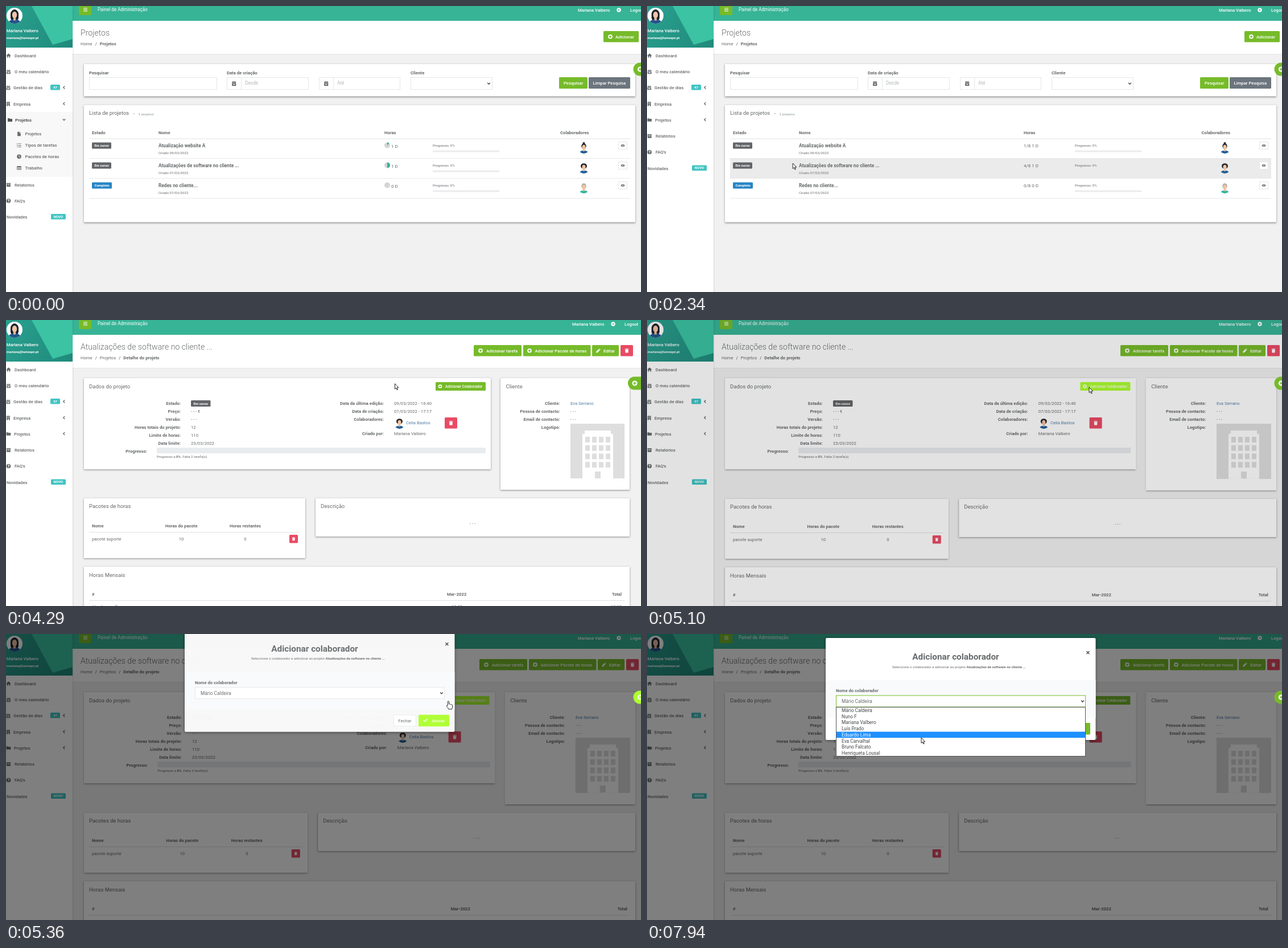
An HTML page with a canvas for the animation above (8000 ms loop, 1116 by 502 pixels).

```html
<!DOCTYPE html>
<html lang="pt">
<head>
<meta charset="utf-8">
<title>Painel de Administração</title>
<style>
html, body { margin: 0; width: 100%; height: 100%; overflow: hidden; background: #f1f1f1; }
canvas { display: block; }
</style>
</head>
<body>
<canvas id="stage" width="1116" height="502"></canvas>
<script>
const c = document.getElementById('stage').getContext('2d');
const LOOP = 8000;
const GREEN = '#76bb2a', LIME = '#adff2f', TEAL = '#37b496', TXT = '#676a6c', RED = '#e94b64', LINK = '#4f7ca6', AQUA = '#40c4c4';
const USER = 'Mariana Valbero', MAIL = 'mariana@lumeqor.pt', MEMBER = 'Celia Bastos', CLIENT = 'Eva Serrano';
const PEOPLE = ['Mário Caldeira', 'Nuno F', USER, 'Luís Prado', 'Eduardo Lima', 'Eva Carvalhal', 'Bruno Falcato', 'Henriqueta Lousal'];
const PROJECT = 'Atualizações de software no cliente ...';

const DISC = 'M-4 0A4 4 0 1 1 4 0A4 4 0 1 1-4 0Z';
const ICONS = {
  home: 'M-4.4 0L0-4L4.4 0H3V3.6H.9V1H-.9V3.6H-3V0Z',
  cal: 'M-3.5-3H-2V-4H-1V-3H1V-4H2V-3H3.5V4H-3.5ZM-3.5-1.5V-.7H3.5V-1.5ZM-2 .7V2.3H2V.7Z',
  building: 'M-3-4H3V4H1V2H-1V4H-3ZM-1.6-3V-1.8H-.5V-3ZM.5-3V-1.8H1.6V-3ZM-1.6-.8V.4H-.5V-.8ZM.5-.8V.4H1.6V-.8Z',
  folder: 'M-4-3H-1L0-2H4V3H-4Z',
  file: 'M-3-4H.6V-1.4H3V4H-3ZM1.2-4L3-2H1.2Z',
  list: 'M-4-3.5H-2.6V-2.3H-4ZM-1.5-3.4H4V-2.4H-1.5ZM-4-.6H-2.6V.6H-4ZM-1.5-.5H4V.5H-1.5ZM-4 2.3H-2.6V3.5H-4ZM-1.5 2.4H4V3.4H-1.5Z',
  clock: DISC + 'M-.5-2.5V.4L1.5 1.8L2 1.1L.5 0V-2.5Z',
  table: 'M-4-3.4H4V3.4H-4ZM-3-1.2V.2H-.5V-1.2ZM.5-1.2V.2H3V-1.2ZM-3 1.1V2.4H-.5V1.1ZM.5 1.1V2.4H3V1.1Z',
  archive: 'M-4-3.5H4V-1.5H-4ZM-3.5-1H3.5V3.5H-3.5ZM-1.2-.2V.6H1.2V-.2Z',
  help: DISC + 'M-1.6-1A1.6 1.6 0 1 1 .5.6V1.2H-.5V0A.7.7 0 1 0-.7-1ZM-.5 1.8H.5V2.8H-.5Z',
  plus: DISC + 'M-.7-2.3H.7V-.7H2.3V.7H.7V2.3H-.7V.7H-2.3V-.7H-.7Z',
  trash: 'M-3.5-3.5H-1.2L-.8-4H.8L1.2-3.5H3.5V-2.5H-3.5ZM-3-2H3L2.6 4H-2.6Z',
  pencil: 'M-4 4L-3.6 1.6L.8-2.8L2.8-.8L-1.6 3.6ZM1.4-3.4L2.2-4L4-2.2L3.4-1.4Z',
  gear: 'M-.8-4H.8L1.1-2.7 2.3-3.4 3.4-2.3 2.7-1.1 4-.8V.8L2.7 1.1 3.4 2.3 2.3 3.4 1.1 2.7 .8 4H-.8L-1.1 2.7-2.3 3.4-3.4 2.3-2.7 1.1-4 .8V-.8L-2.7-1.1-3.4-2.3-2.3-3.4-1.1-2.7ZM-1.3 0A1.3 1.3 0 1 0 1.3 0A1.3 1.3 0 1 0-1.3 0Z',
  eye: 'M-4 0Q0-5 4 0Q0 5-4 0ZM-1.7 0A1.7 1.7 0 1 0 1.7 0A1.7 1.7 0 1 0-1.7 0ZM-.9 0A.9.9 0 1 0 .9 0A.9.9 0 1 0-.9 0Z',
  check: 'M-4 .2L-2.8-1L-1.2.8L2.9-3.2L4-2L-1.2 3Z',
  menu: 'M-3.5-3H3.5V-2H-3.5ZM-3.5-.5H3.5V.5H-3.5ZM-3.5 2H3.5V3H-3.5Z'
};
for (const k in ICONS) ICONS[k] = new Path2D(ICONS[k]);
const ARROW = new Path2D('M0 0V9.4L2.2 7.5L3.7 11L5.2 10.4L3.7 7H6.6Z');
const HAND = new Path2D('M0 0C1-.5 1.5.2 1.5 1V5C3 4.6 3.6 5 3.9 5.6C5 5.2 5.6 5.6 6 6.2C7 6 7.6 6.6 7.6 7.5V10C7.6 12 6.5 12.5 6.5 14H1C.8 12.5-1.6 10.5-2.6 8.3C-2.9 7.2-1.6 6.8-.8 7.8V.9Q-.8.2 0 0Z');

// Pointer stops: time, x, y
const PATH = [[70, 420, 416], [300, 262, 300], [560, 95, 224], [760, 50, 204], [960, 48, 206], [1100, 40, 221], [1310, 40, 221],
  [1390, 43, 228], [2050, 43, 228], [2340, 256, 276], [2600, 305, 275], [2800, 305, 275], [2870, 309, 278], [3070, 309, 278],
  [3270, 321, 281], [3900, 321, 281], [4290, 683, 112], [4440, 745, 74], [4700, 775, 117], [4970, 775, 117], [5060, 777, 118],
  [5420, 777, 118], [5770, 621, 103], [5840, 619, 104], [6040, 619, 104], [6120, 620, 111], [6300, 620, 111], [6930, 483, 187],
  [7730, 483, 186], [7940, 482, 182], [LOOP, 482, 182]];

const clamp = v => Math.max(0, Math.min(1, v));

function pointer(t) {
  const i = PATH.findIndex(p => p[0] > t);
  const [t0, x0, y0] = PATH[i - 1], [t1, x1, y1] = PATH[i], k = (t - t0) / (t1 - t0);
  return [x0 + (x1 - x0) * k, y0 + (y1 - y0) * k];
}

// y is the middle of the capitals
function text(s, x, y, size = 7.7, color = TXT, weight = 400, align = 'left') {
  c.font = `${weight} ${size}px Roboto, sans-serif`;
  c.fillStyle = color;
  c.textAlign = align;
  c.fillText(s, x, y + size * .36);
  return c.measureText(s).width;
}
const bold = (s, x, y, align, size = 7.7) => text(s, x, y, size, TXT, 700, align);
function rect(x, y, w, h, color) { c.fillStyle = color; c.fillRect(x, y, w, h); }
function round(x, y, w, h, color, r = 1.5) {
  c.fillStyle = color;
  c.beginPath(); c.roundRect(x, y, w, h, r); c.fill();
}
function box(x, y, w, h, color = '#e5e6e7', fill = '#fff') {
  rect(x, y, w, h, fill);
  c.strokeStyle = color; c.lineWidth = 1;
  c.strokeRect(x + .5, y + .5, w - 1, h - 1);
}
function disc(x, y, r, color) { oval(x, y, r, r, color); }
function oval(x, y, rx, ry, color) {
  c.fillStyle = color;
  c.beginPath(); c.ellipse(x, y, rx, ry, 0, 0, 7); c.fill();
}
function icon(name, x, y, color = TXT, k = 1) {
  c.save(); c.translate(x, y); c.scale(k, k);
  c.fillStyle = color; c.fill(ICONS[name], 'evenodd');
  c.restore();
}
function chevron(x, y, down, color = TXT) {
  c.strokeStyle = color; c.lineWidth = 1.3;
  c.beginPath();
  if (down) { c.moveTo(x - 2.3, y - 1.2); c.lineTo(x, y + 1.2); c.lineTo(x + 2.3, y - 1.2); }
  else { c.moveTo(x + 1.2, y - 2.5); c.lineTo(x - 1.2, y); c.lineTo(x + 1.2, y + 2.5); }
  c.stroke();
}
function card(x, y, w, h) {
  c.save();
  c.shadowColor = 'rgba(0,0,0,.42)'; c.shadowBlur = 3; c.shadowOffsetY = 1;
  rect(x, y, w, h, '#fff');
  c.restore();
}
function button(x, y, w, h, color, name, label, ix, tx, size = 7.7) {
  round(x, y, w, h, color);
  if (name) icon(name, x + ix, y + h / 2, '#fff', size / 8);
  if (label) text(label, x + tx, y + h / 2, size, '#fff', 500);
}
function badge(x, y, w, color, label, h = 11) {
  round(x, y, w, h, color);
  text(label, x + w / 2, y + h / 2, 6, '#fff', 700, 'center');
}
function avatar(x, y, r, hair, shirt, style) {
  c.save();
  c.beginPath(); c.arc(x, y, r, 0, 7); c.clip();
  if (style == 'long') { rect(x - r, y - r, 2 * r, 2 * r, '#fff'); round(x - r * .5, y - r * .7, r, r * 1.4, hair, r * .45); }
  if (style == 'bun') disc(x, y - r * .82, r * .2, hair);
  oval(x, y + r * 1.05, r * .85, r * .6, shirt);
  rect(x - r * .15, y + r * .1, r * .3, r * .5, '#e9b793');
  oval(x, y - r * .3, r * (style == 'curly' ? .55 : .42), r * .48, hair);
  oval(x, y - r * .1, r * .3, r * .42, '#f0c4a2');
  c.restore();
}
const TEAM = [['#2b2b33', '#1f5f9a', 'bun'], ['#25252b', '#1f5f9a', 'curly'], ['#b4b0a4', '#38b59c', 'short']];

function sidebar(open, hover, ready) {
  rect(0, 0, 117, 502, '#fff');
  const g = c.createLinearGradient(0, 0, 117, 73);
  g.addColorStop(0, '#2aa08f'); g.addColorStop(1, '#1f8a7b');
  rect(0, 0, 117, 73, g);
  c.fillStyle = '#3bc3a3';
  c.beginPath(); c.moveTo(45, 0); c.lineTo(82, 68); c.lineTo(117, 58); c.lineTo(117, 0); c.fill();
  if (ready) avatar(15, 17, 14, '#1d2330', '#23538c', 'long');
  text(USER, 1, 43, 7.6, '#fff', 500);
  text(MAIL, 1, 55.5, 6, '#fff', 700);

  const item = (name, label, x, y, ix = 4.5) => { if (name) icon(name, ix, y, TXT, .95); text(label, x, y, 7.7, TXT, 500); };
  item('home', 'Dashboard', 15, 87);
  item('cal', 'O meu calendário', 15, 115.5);
  item('cal', 'Gestão de dias', 13, 143.5, 4);
  badge(78, 138, 17, AQUA, '47', 9.5);
  chevron(102, 143, false);
  item('building', 'Empresa', 13, 172, 4);
  chevron(102, 171.5, false);
  if (open) {
    rect(0, 186, 117, 114, '#f8f8f8');
    if (hover == 1) rect(0, 186, 117, 28, GREEN);
    if (hover == 2) rect(0, 215, 117, 19, GREEN);
    icon('folder', 7, 200, '#555');
    text('Projetos', 16, 200, 7.7, '#555', 700);
    [['file', 'Projetos'], ['list', 'Tipos de tarefas'], ['clock', 'Pacotes de horas'], ['table', 'Trabalho']]
      .forEach(([n, s], i) => item(n, s, 33.5, 224.5 + 19.9 * i, 23));
  } else item('folder', 'Projetos', 14, 200);
  chevron(102, 199.5, open);
  const y = open ? 314 : 228.5;
  item('archive', 'Relatórios', 15, y);
  item('help', "FAQ's", 15, y + 28);
  item('', 'Novidades', 1, y + 56.5);
  badge(79, y + 51, 26, AQUA, 'NOVO', 9.5);
}

function header(dx, title, crumbs) {
  rect(117, 0, 999, 26, TEAL);
  round(128, -5, 22, 21, GREEN);
  icon('menu', 139.5, 6.5, '#fff');
  text('Painel de Administração', 161, 6, 8.15, '#fff');
  text(USER, 995 + dx, 7, 7.7, '#fff', 500);
  icon('gear', 1067 + dx, 7, '#fff');
  text('Logout', 1087 + dx, 7, 7.7, '#fff', 500);
  rect(117, 26, 999, 58.5, '#fff');
  rect(117, 84, 999, 1, '#e2e4e5');
  text(title, 131, 46.5, 14.1, TXT, 300);
  let x = 131;
  crumbs.forEach((s, i) => {
    const last = i == crumbs.length - 1;
    x += text(s, x, 66.5, 7.7, TXT, last ? 700 : 400) + 5;
    if (!last) x += text('/', x, 66.5, 7.7, TXT, 500) + 5;
  });
}

function listPage(plain, row) {
  header(10, 'Projetos', ['Home', 'Projetos']);
  button(1050, 44, 62, 19.5, GREEN, 'plus', 'Adicionar', 12, 21);
  card(137, 102, 969, 56.5);
  bold('Pesquisar', 146, 117);
  bold('Data de criação', 388, 117);
  bold('Cliente', 711, 117);
  box(146, 125, 225, 22);
  [[388, 144, 'Desde'], [550, 143, 'Até']].forEach(([x, w, s]) => {
    box(x, 125, w, 22);
    rect(x + 25, 125, 1, 22, '#e5e6e7');
    icon('cal', x + 12.7, 136, '#555');
    text(s, x + 32, 135.5, 8.3, '#b4b8bb');
  });
  box(711, 125, 144, 22);
  chevron(848.5, 136, true, '#444');
  button(972, 125, 50, 20, GREEN, '', 'Pesquisar', 0, 8);
  button(1024, 125, 73, 20, '#6c757d', '', 'Limpar Pesquisa', 0, 7.5);

  card(137, 174, 969, 205.5);
  text('Lista de projetos', 146, 188, 9.5);
  disc(225, 189, .9, '#a5b5b0');
  text('3 projetos', 232.5, 189.5, 6.1, '#8d9a9a');
  const nx = plain ? 267 : 268, hx = plain ? 662 : 665, px = plain ? 752 : 750;
  bold('Estado', 151, 222);
  bold('Nome', nx, 222);
  bold('Horas', hx, 222);
  bold('Colaboradores', plain ? 974.5 : 974, 222);
  rect(146, 232.5, 951, 1, '#dfe1e2');
  [['Atualização website A', '09', 1], [PROJECT, '07', 4], ['Redes no cliente...', '07', 0]].forEach(([name, day, part], i) => {
    const y = 245 + 35 * i, days = part ? '1 D' : '0 D';
    if (row == i) rect(146, y - 12, 951, 34, '#ebebeb');
    rect(146, y + 22, 951, 1, '#e7e9ea');
    badge(151, y - 5.5, i == 2 ? 35 : 34, i == 2 ? '#2785c6' : '#636568', i == 2 ? 'Completo' : 'Em curso');
    bold(name, nx, y, 'left', 8.25);
    text(`Criado ${day}/03/2022`, nx, y + 12.5, 6.2);
    if (plain) text(`${part}/8 ${days}`, hx, y, 8);
    else {
      disc(670, y - .5, 5, '#d3d5d6');
      c.fillStyle = TEAL;
      c.beginPath(); c.moveTo(670, y - .5);
      c.arc(670, y - .5, 5, -Math.PI / 2, -Math.PI / 2 + part * Math.PI / 4); c.fill();
      text(days, 677, y + 1.5, 8);
    }
    text('Progresso: 0%', px, y, 6.1);
    rect(px, y + 8.5, 117, 3, '#ebebee');
    avatar(1015.5, y + 4, 10, ...TEAM[i]);
    box(1076, y - 7, 16, 14);
    icon('eye', 1084, y, '#555', .9);
  });
}

function detailPage(wide, lit) {
  const dx = wide ? 10 : 0, dy = wide ? 1 : 0, k = wide ? 969 / 959 : 1;
  const X = x => 137 + (x - 137) * k;
  const panel = (x, y, r, b) => card(X(x), y, X(r) - X(x), b - y);
  const fields = (lx, vx, rows) => rows.forEach(([label, y, value, color]) => {
    bold(label + ':', X(lx), y, 'right');
    if (value) text(value, X(vx), y, 7.7, color);
  });
  header(dx, PROJECT, ['Home', 'Projetos', 'Detalhe do projeto']);
  button(822 + dx, 44, 84, 19.5, GREEN, 'plus', 'Adicionar tarefa', 12, 22);
  button(909 + dx, 44, 118.5, 19.5, GREEN, 'plus', 'Adicionar Pacote de horas', 11, 20.5);
  button(1030 + dx, 44, 47, 19.5, GREEN, 'pencil', 'Editar', 11, 20);
  button(1080 + dx, 44, 22, 19.5, RED, 'trash', '', 11);

  panel(137, 102, 852, 262);
  text('Dados do projeto', 146, 117, 9.5);
  button(X(755), 109, 88, 15, lit ? LIME : GREEN, 'plus', 'Adicionar Colaborador', 8, 17, 6.5);
  fields(307, 325, [['Estado', 146], ['Preço', 160, '- - - €'], ['Versão', 174, '- - -'], ['Horas totais do projeto', 188, '12'],
    ['Limite de horas', 202, '110'], ['Data limite', 216, '23/03/2022']]);
  badge(X(325), 141, 34.5, '#636568', 'Em curso');
  fields(664, 682, [['Data da última edição', 146, '09/03/2022 - 16:40'], ['Data de criação', 160, '07/03/2022 - 17:17'],
    ['Colaboradores', 174], ['Criado por', 199, USER]]);
  avatar(X(691.5), 181, 10, ...TEAM[1]);
  text(MEMBER, X(703), 180.5, 7.7, LINK);
  button(X(771), 171, 22, 19.5, RED, 'trash', '', 11);
  bold('Progresso:', X(248), 230, 'right');
  rect(X(265), 224, 578 * k, 10, '#e9ecef');
  let x = X(265);
  x += text('Progresso a ', x, 240, 6.1);
  x += bold('0%', x, 240, 'left', 6.1);
  text('. Falta 2 tarefa(s)', x, 240, 6.1);

  panel(869, 102, 1096, 298 + dy);
  text('Cliente', X(878.5), 117, 9.5);
  fields(973.5, 992, [['Cliente', 146, CLIENT, LINK], ['Pessoa de contacto', 160, '- - -'], ['Email de contacto', 174, '- - -'], ['Logotipo', 188]]);
  const bx = X(992);
  rect(bx, 182, 95 * k, 96 * k, '#dedede');
  rect(bx + 25, 194, 46, 8, '#fff');
  rect(bx + 21, 200, 54, 78 * k, '#fff');
  for (let i = 0; i < 16; i++) rect(bx + 26 + (i % 4) * 12, 205 + (i >> 2) * 14.7, 8, 10, '#dedede');
  rect(bx + 43, 266, 10, 12 * k, '#dedede');

  panel(137, 313 + dy, 526, 418 + dy);
  text('Pacotes de horas', 146, 327 + dy, 9.5);
  bold('Nome', 151, 361 + dy);
  bold('Horas do pacote', X(280), 361 + dy);
  bold('Horas restantes', X(393), 361 + dy);
  rect(146, 372 + dy, 371 * k, 1, '#dfe1e2');
  text('pacote suporte', 151, 384 + dy);
  text('10', X(308), 384 + dy, 7.7, TXT, 400, 'center');
  text('0', X(420.5), 384 + dy, 7.7, TXT, 400, 'center');
  button(X(498), 377 + dy, 15, 14.5, RED, 'trash', '', 7.5, 0, 6);
  panel(544, 313 + dy, 1096, 380 + dy);
  text('Descrição', X(553), 327 + dy, 9.5);
  text('- - -', X(820), 357 + dy, 7.7, TXT, 400, 'center');
  panel(137, 433 + dy, 1096, 520);
  text('Horas Mensais', 146, 447.5 + dy, 9.5);
  bold('#', 151, 481 + dy);
  bold('Mar-2022', X(775), 481 + dy);
  bold('Total', X(1082), 481 + dy, 'right');
  rect(146, 492 + dy, 941 * k, 1, '#dfe1e2');
  text('Atualizar software', 151, 503.5 + dy * 3);
  text('10:00', X(783), 503.5 + dy * 3);
  text('10:00', X(1082), 503.5 + dy * 3, 7.7, TXT, 400, 'right');
}

function fab(wide, color = GREEN) {
  const x = wide ? 1114 : 1104.5;
  round(x - 11.5, 99.5, 40, 23, color, 11.5);
  icon('plus', x + .5, 111, '#fff', 1.15);
}

function modal(t, lit, my) {
  const k = clamp((t - 5217) / 300), focus = t >= 6260;
  c.save();
  c.globalAlpha = clamp((t - 5217) / 150);
  c.translate(0, -45 * (1 - k) ** 1.75);
  c.save();
  c.shadowColor = 'rgba(0,0,0,.5)'; c.shadowBlur = 5; c.shadowOffsetY = 1;
  round(314, 7, 474.5, 179, '#fff', 2);
  c.restore();
  text('×', 775, 32, 13, '#555', 700, 'center');
  text('Adicionar colaborador', 542.5, 39.5, 15.3, TXT, 700, 'center');
  const x = 431 + text('Seleccione o colaborador a adicionar ao projeto ', 431, 57.5, 6.1);
  bold(PROJECT, x, 57.5, 'left', 6.1);
  rect(314, 81, 474.5, 66, '#f8fafb');
  bold('Nome do colaborador', 332, 99.5);
  box(332, 107.5, 439, 21, focus ? GREEN : '#e5e6e7');
  text(PEOPLE[0], 342, 118, 8.35);
  chevron(765.5, 118, true, '#333');
  box(681, 156, 40, 20.5, '#e7eaec');
  text('Fechar', 701, 166.5, 7.7, TXT, 400, 'center');
  button(725, 156, 54, 20.5, lit ? LIME : GREEN, 'check', 'Gravar', 12, 23.5);
  if (t >= 6330) {
    const pick = Math.max(0, Math.min(7, Math.floor((my - 128.6) / 10.7)));
    box(332, 128, 439, 87, '#555');
    PEOPLE.forEach((name, i) => {
      const y = 134 + 10.7 * i, on = i == (t > 7735 ? 4 : pick);
      if (on) rect(333, y - 5.3, 437, 10.7, '#1e90ff');
      text(name, 342, y, 8.35, on ? '#fff' : '#45484a');
    });
  }
  c.restore();
}

function draw(t) {
  const [mx, my] = t < 70 ? [-50, -50] : pointer(t);
  const list = t < 3410, open = t < 2050, wide = t < 3750 || t >= 5050;
  const lit = !list && t < 5450 && (t > 4970 || mx > 755 && mx < 843 && my > 109 && my < 124);
  const glow = t > 5220 && t < 5450;
  const hover = !open || mx > 117 ? 0 : my > 186 && my < 214 ? 1 : my >= 215 && my < 234 ? 2 : 0;
  const row = mx > 146 && my > 233 && my < 338 ? Math.floor((my - 233) / 35) : -1;

  rect(0, 0, 1116, 502, '#f1f1f1');
  if (list) listPage(t > 2050 && t < 2480, row); else detailPage(wide, lit);
  rect(117, 0, 1.5, 502, 'rgba(0,0,0,.08)');
  sidebar(open, hover, t < 3410 || t >= 3750);
  rect(0, 0, 1116, 502, `rgba(0,0,0,${clamp((t - 5067) / 150) / 2})`);
  fab(wide, glow ? LIME : GREEN);
  if (t >= 5217) modal(t, glow, my);

  const hand = hover || list && !open && mx > 267 || lit && t < 5050 || glow;
  c.save();
  c.translate(mx, my);
  c.fillStyle = '#fff'; c.strokeStyle = '#111'; c.lineWidth = .9;
  const shape = hand ? HAND : ARROW;
  c.fill(shape); c.stroke(shape);
  c.restore();
}

function frame() {
  draw(performance.now() % LOOP);
  requestAnimationFrame(frame);
}
frame();
</script>
</body>
</html>
```
